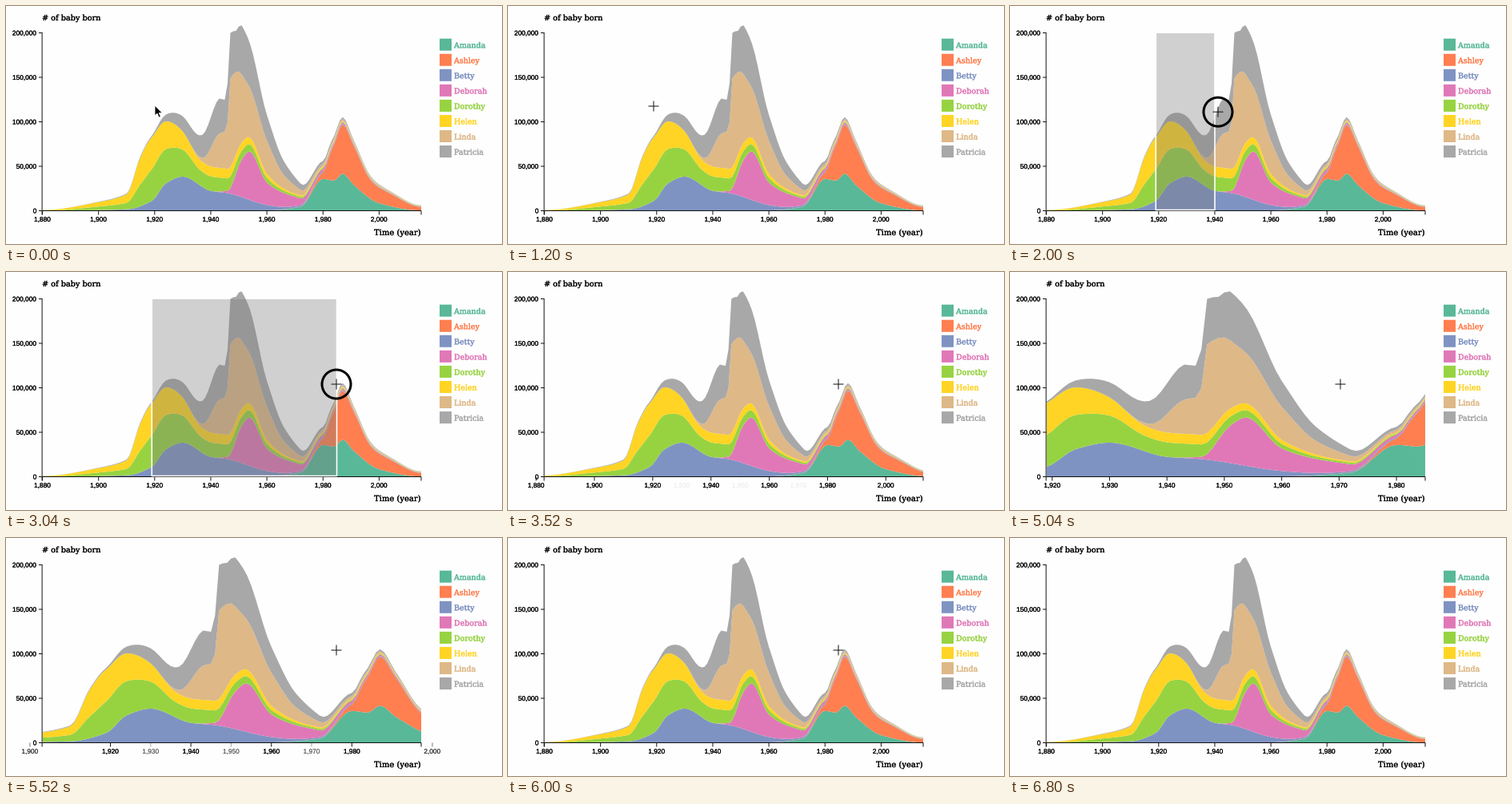
Write a matplotlib script that moves like this. It is 620 px wide and 297 px high and loops after 6.88 s.

```python
import numpy as np
import matplotlib.pyplot as plt
from matplotlib.animation import FuncAnimation
from matplotlib.patches import Circle, Polygon, Rectangle
from matplotlib.patheffects import withStroke

W, H, DPI = 620, 297, 100
STEP, FRAMES = 80, 86
LEFT, RIGHT, TOP, BASE = 45.5, 519, 33.5, 255.5
FULL, ZOOM = (1880, 2015), (1919, 1985)
ZOOM_IN, ZOOM_OUT, ZOOM_TIME = 3310, 4990, 1000
DRAG_START, DRAG_END = 1400, 2920
ARROW_END, CURSOR_END = 600, 6320
YEARS = np.arange(1880, 2016)


def px(n):
    """Pixels to points."""
    return n * 72 / DPI


def curve(points):
    """Yearly births in thousands: monotone cubic through {year: value}."""
    xs, ys = np.array(sorted({1880: 0, 2015: .3, **points}.items())).T
    h = np.diff(xs)
    d = np.diff(ys) / h
    a, b = d[:-1], d[1:]
    same = a * b > 0
    m = np.zeros(len(xs))
    m[1:-1][same] = 2 * a[same] * b[same] / (a + b)[same]
    i = np.clip(np.searchsorted(xs, YEARS, "right") - 1, 0, len(h) - 1)
    t = (YEARS - xs[i]) / h[i]
    bend = m[i] * t * (1 - t) ** 2 - m[i + 1] * t ** 2 * (1 - t)
    return ys[i] + h[i] * (d[i] * t * t * (3 - 2 * t) + bend)


SERIES = [
    ("Amanda", "#59b898", {1960: .3, 1972: 4.5, 1980: 35.8, 1984: 33.9,
                           1987: 41.8, 1991: 28.9, 2000: 8.5}),
    ("Ashley", "#ff7f50", {1972: .2, 1980: 7.3, 1983: 33.3, 1987: 55,
                           1991: 43.5, 1997: 21, 2005: 13, 2015: 4}),
    ("Betty", "#7f93c3", {1910: 1.5, 1919: 11, 1924: 30.6, 1930: 38.2,
                          1940: 22.1, 1946: 19.5, 1960: 6, 1970: 1.6}),
    ("Deborah", "#e078b7", {1940: 0, 1946: 2.5, 1951: 42, 1954: 54.7,
                            1960: 25.3, 1970: 10.8, 1974: 5.5, 1985: 2}),
    ("Dorothy", "#97d341", {1900: 4, 1910: 7.3, 1915: 25, 1922: 39.5,
                            1930: 30.4, 1936: 17.5, 1943: 15.6, 1955: 7.5,
                            1970: 2}),
    ("Helen", "#ffd424", {1880: .7, 1900: 5, 1910: 9.5, 1915: 30.5, 1918: 36,
                          1924: 31.2, 1937: 11, 1943: 11, 1970: 1.5}),
    ("Linda", "#deb887", {1932: 0, 1937: 4.4, 1943: 38.4, 1945: 41.5,
                          1946: 52.7, 1947: 99.7, 1954: 55.4, 1960: 37.3,
                          1966: 15.2, 1976: 3.5}),
    ("Patricia", "#a8a8a8", {1918: 1.5, 1930: 17, 1936: 24, 1943: 39.4,
                             1945: 35.8, 1947: 51.2, 1949: 46.2, 1951: 55,
                             1960: 29, 1967: 14.2, 1975: 5, 1995: 1}),
]
EDGES = np.cumsum([0 * YEARS] + [curve(s[2]) for s in SERIES], axis=0)

fig = plt.figure(figsize=(W / DPI, H / DPI), dpi=DPI, facecolor="#fefefe")
ax = fig.add_axes([0, 0, 1, 1])
ax.set(xlim=(0, W), ylim=(H, 0))
ax.axis("off")


def ease(p):
    """Cubic in-out."""
    p = min(max(p, 0), 1)
    return 4 * p ** 3 if p < .5 else 1 - 4 * (1 - p) ** 3


def glide(p):
    """Sine in-out."""
    return (1 - np.cos(np.pi * min(max(p, 0), 1))) / 2


def scale(year, domain):
    lo, hi = domain
    return LEFT + (year - lo) / (hi - lo) * (RIGHT - LEFT)


def x_at(year, z):
    return (1 - z) * scale(year, FULL) + z * scale(year, ZOOM)


def y_at(k):
    return BASE - k * (BASE - TOP) / 200


def line(xs, ys, color="#111111", width=1, z=5):
    return ax.plot(xs, ys, color=color, lw=px(width), zorder=z, snap=False,
                   solid_capstyle="butt")[0]


def label(x, y, s, size=8.3, font="Liberation Sans", color="black", bold=.2,
          **kw):
    heavy = [withStroke(linewidth=px(bold), foreground=color)]
    return ax.text(x, y, s, fontsize=px(size), family=font, color=color,
                   zorder=6, path_effects=heavy, **kw)


def slab(x, y, s, size, color="black", **kw):
    return label(x, y, s, size, "DejaVu Serif", color, **kw)


# Stacked areas
clip = Rectangle((LEFT, 0), RIGHT - LEFT, BASE, transform=ax.transData)
areas = []
for (_, color, _), low, high in zip(SERIES, EDGES, EDGES[1:]):
    area = Polygon([(0, 0)], fc=color, lw=0, zorder=2)
    ax.add_patch(area)
    area.set_clip_path(clip)
    areas.append((area, y_at(np.r_[low, high[::-1]])))
AROUND = np.r_[YEARS, YEARS[::-1]]

# Axes
line([LEFT - .4] * 2, [TOP, BASE])
line([LEFT, RIGHT], [BASE, BASE])
for x in (LEFT - .4, RIGHT):
    line([x, x], [BASE, BASE + 5])
for k in range(0, 201, 50):
    line([LEFT - 4.5, LEFT], [y_at(k)] * 2)
    label(38.5, y_at(k) + 3, f"{k * 1000:,}", ha="right")
ticks = []
for year in (*range(1880, 2001, 20), 1930, 1950, 1970):
    tick = line([0, 0], [BASE, BASE + 5])
    ticks.append((year, tick, label(0, 269, f"{year:,}", ha="center")))

slab(45, 18, "# of baby born", 9.7)
slab(519, 286, "Time (year)", 10, ha="right")
for i, (name, color, _) in enumerate(SERIES):
    y = 48.2 + 19.05 * i
    ax.add_patch(Rectangle((542, y - 7.5), 15, 15, fc=color, lw=0, snap=False))
    slab(560, y + 4, name, 9.5, color, bold=.35)

# Brush and cursors
brush = Rectangle((0, TOP), 0, BASE - TOP - 1, fc="#777777", alpha=.34, lw=0,
                  zorder=3)
ring = Circle((0, 0), 18, fill=False, ec="black", lw=px(3), zorder=8)
arrow = Polygon([(0, 0)], fc="black", ec="white", lw=px(.9), zorder=9)
for patch in (brush, ring, arrow):
    ax.add_patch(patch)
brush_edge = line([], [], "white", 1.6, 5.5)
cross = [line([], [], z=9), line([], [], z=9)]
ARROW = np.array([(0, 0), (0, 13), (3, 10.3), (5.2, 15.2), (7.4, 14.2),
                  (5.3, 9.5), (9.4, 9.4)])


def cursor(t):
    if t < DRAG_START:
        p = glide((t - 300) / 600)
        return 186 - 4 * p, 124 + p
    p = glide((t - DRAG_START) / (DRAG_END - DRAG_START))
    return 182 + 231 * p, 125 + 15 * p ** .68


def draw(n):
    t = n * STEP
    z = ease((t - ZOOM_IN) / ZOOM_TIME) - ease((t - ZOOM_OUT) / ZOOM_TIME)
    xs = x_at(AROUND, z)
    for area, ys in areas:
        area.set_xy(np.column_stack([xs, ys]))

    for year, tick, text in ticks:
        x = x_at(year, z)
        if year in (1880, 1900, 2000):
            alpha = 1 - z
        else:
            alpha = z if year % 20 else 1
        tick.set_xdata([x, x])
        text.set_x(x)
        for part in (tick, text):
            part.set_alpha(alpha)
            part.set_visible(alpha > .01 and -20 < x < W + 20)

    x, y = cursor(t)
    pressed = DRAG_START <= t < ZOOM_IN
    start = scale(ZOOM[0], FULL)
    end = max(cursor(t - 20)[0] + .5, start)
    for part in (brush, brush_edge):
        part.set_visible(pressed and end > start)
    brush.set_x(start)
    brush.set_width(end - start)
    brush_edge.set_data([start, start, end, end],
                        [TOP, BASE - 1, BASE - 1, TOP])
    ring.set_visible(pressed)
    ring.center = x, y

    arrow.set_visible(t < ARROW_END)
    arrow.set_xy(ARROW + (x, y))
    cross[0].set_data([x - 6.5, x + 6.5], [y, y])
    cross[1].set_data([x, x], [y - 6.5, y + 6.5])
    for part in cross:
        part.set_visible(ARROW_END <= t < CURSOR_END)
    return []


anim = FuncAnimation(fig, draw, frames=FRAMES, interval=STEP, repeat=True,
                     repeat_delay=0, init_func=lambda: draw(0))
plt.show()
```
